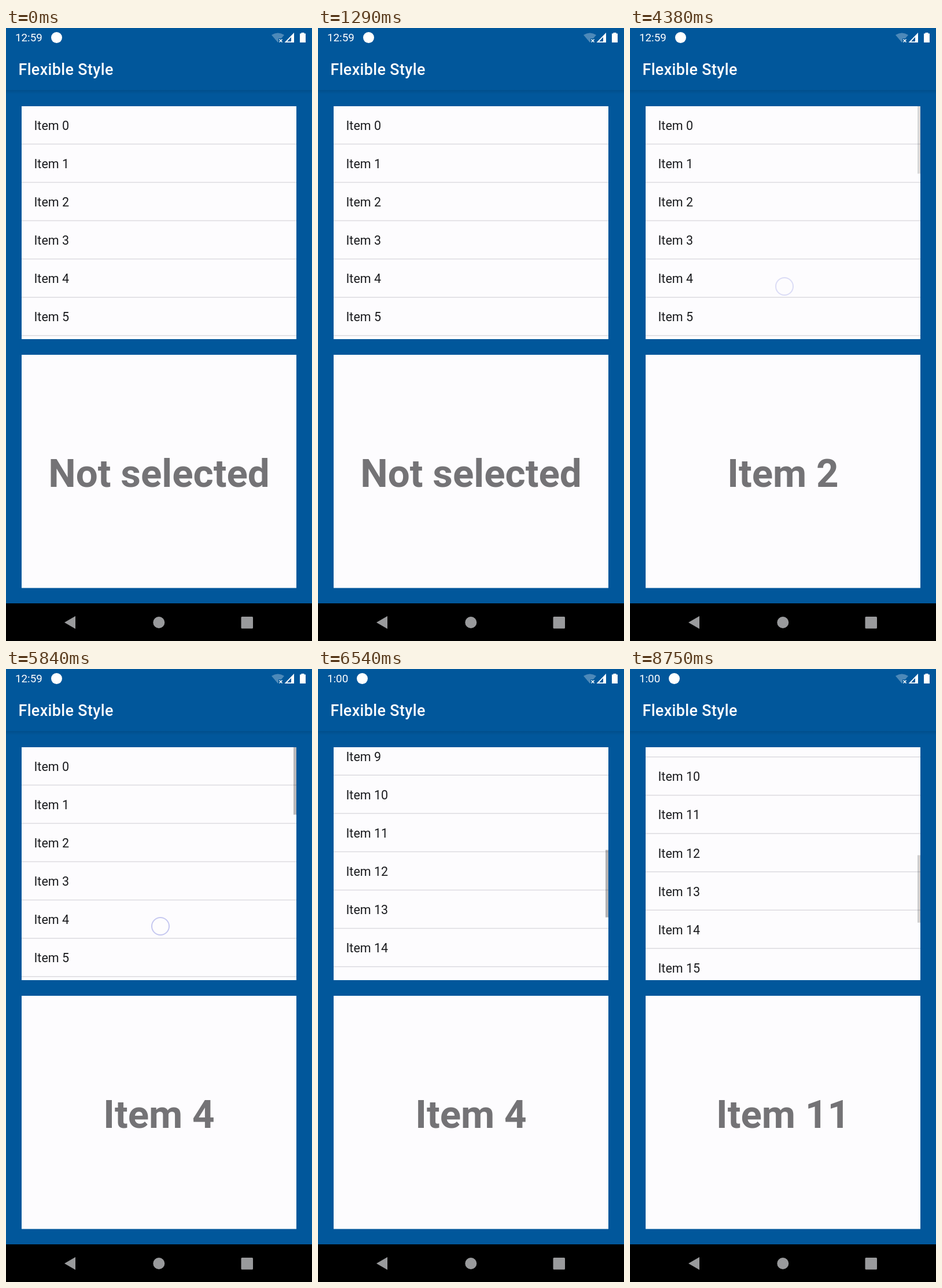
An HTML page with a canvas for the animation above (8.83 s loop, 529x1058 px).

```html
<!DOCTYPE html>
<html lang="en">
<head>
<meta charset="utf-8">
<title>Flexible Style</title>
<style>
  html, body { margin: 0; width: 100%; height: 100%; overflow: hidden; background: #01579b; }
  canvas { display: block; }
</style>
</head>
<body>
<canvas id="stage" width="529" height="1058"></canvas>
<script>
const ctx = document.getElementById('stage').getContext('2d');
const LOOP = 8830;
const BLUE = '#01579b', PAPER = '#fdfcfe', INK = '#1a1b1e';
const LIST = { x: 27, y: 135, w: 475, h: 402 };
const ROW = 66.1, COUNT = 21;

const DRAG = { from: 5850, to: 6100, end: 6870, dragged: 240, total: 643.5 };
const TAPS = [
  { item: 2, x: 259, y: 305, down: 2740, up: 2850, click: 2880 },
  { item: 4, x: 267, y: 446, down: 4350, up: 4450, click: 4470 },
  { item: 11, x: 262, y: 262, down: 7170, up: 7270, click: 7290 }
];
const CLOCK_TICK = 6200;

const clamp = v => Math.max(0, Math.min(1, v));
const progress = (t, from, to) => clamp((t - from) / (to - from));

function scrollAt(t) {
  if (t < DRAG.to) return DRAG.dragged * progress(t, DRAG.from, DRAG.to) ** 2;
  const left = (1 - progress(t, DRAG.to, DRAG.end)) ** 3;
  return DRAG.total - (DRAG.total - DRAG.dragged) * left;
}

function rect(color, x, y, w, h) {
  ctx.fillStyle = color;
  ctx.fillRect(x, y, w, h);
}

function disc(color, x, y, r) {
  ctx.fillStyle = color;
  ctx.beginPath();
  ctx.arc(x, y, r, 0, Math.PI * 2);
  ctx.fill();
}

function polygon(color, ...points) {
  ctx.fillStyle = color;
  ctx.beginPath();
  points.forEach(([x, y]) => ctx.lineTo(x, y));
  ctx.closePath();
  ctx.fill();
}

function text(str, x, y, font, color, align = 'left', spacing = '0px') {
  ctx.font = `${font} Roboto, sans-serif`;
  ctx.fillStyle = color;
  ctx.textAlign = align;
  ctx.letterSpacing = spacing;
  ctx.fillText(str, x, y);
}

function drawStatusBar(t) {
  const late = t >= CLOCK_TICK;
  text(late ? '1:00' : '12:59', 16, 23, '18.8px', '#fff');
  disc('#fff', late ? 76.5 : 87.5, 16.5, 9.5);

  // wifi without connection
  ctx.fillStyle = 'rgba(255,255,255,.3)';
  ctx.beginPath();
  ctx.moveTo(470, 25);
  ctx.lineTo(459, 12);
  ctx.quadraticCurveTo(470, 5, 481, 12);
  ctx.fill();
  rect(BLUE, 471, 18, 8, 8);
  ctx.strokeStyle = '#fff';
  ctx.lineWidth = 1.5;
  ctx.beginPath();
  ctx.moveTo(472.5, 19.5); ctx.lineTo(477.5, 24.5);
  ctx.moveTo(477.5, 19.5); ctx.lineTo(472.5, 24.5);
  ctx.stroke();

  // mobile signal
  polygon('#fff', [481.5, 25], [498, 25], [498, 8]);
  polygon(BLUE, [486, 23.2], [493, 23.2], [493, 15.8]);

  // battery
  rect('#fff', 508, 9.5, 10, 15.5);
  rect('#fff', 510.5, 8, 5, 2);
}

function drawAppBar() {
  text('Flexible Style', 21.5, 81, '500 26.9px', '#fff', 'left', '0.35px');
  const shade = ctx.createLinearGradient(0, 107, 0, 114);
  shade.addColorStop(0, 'rgba(0,0,0,.1)');
  shade.addColorStop(1, 'rgba(0,0,0,0)');
  rect(shade, 0, 107, 529, 7);
}

function barOpacity(t) {
  let wake = -Infinity;
  for (const tap of TAPS) if (t >= tap.click) wake = Math.max(wake, tap.click);
  if (t >= DRAG.from) wake = Math.max(wake, Math.min(t, DRAG.end));
  return 1 - progress(t - wake, 1350, 1650);
}

function drawList(t) {
  const scroll = scrollAt(t);
  rect(PAPER, LIST.x, LIST.y, LIST.w, LIST.h);
  ctx.save();
  ctx.beginPath();
  ctx.rect(LIST.x, LIST.y, LIST.w, LIST.h);
  ctx.clip();

  for (let i = 0; i < COUNT; i++) {
    const y = LIST.y + i * ROW - scroll;
    if (y + ROW < LIST.y || y > LIST.y + LIST.h) continue;
    rect('#dcdbe0', LIST.x, y + 64.6, LIST.w, 1.5);
    for (const tap of TAPS) {
      if (tap.item !== i) continue;
      const glow = progress(t, tap.click - 60, tap.click) * (1 - progress(t, tap.click + 80, tap.click + 360));
      if (glow) rect(`rgba(0,0,0,${0.13 * glow})`, LIST.x, y - 1.5, LIST.w, ROW + 1.5);
    }
    text('Item ' + i, 48.5, y + 40.8, '21.5px', INK);
  }

  const length = LIST.h * LIST.h / (COUNT * ROW);
  const top = LIST.y + scroll * LIST.h / (COUNT * ROW);
  rect(`rgba(0,0,0,${0.29 * barOpacity(t)})`, 497, top, 5, length);
  ctx.restore();
}

function drawDetail(t) {
  rect(PAPER, 27, 564, 475, 402.5);
  const chosen = TAPS.filter(tap => t >= tap.click).pop();
  text(chosen ? 'Item ' + chosen.item : 'Not selected', 264.5, 792, 'bold 67.3px', '#747376', 'center');
}

function drawTouch(t, x, y, down, up) {
  const alpha = progress(t, down, down + 50) * (1 - progress(t, up, up + 110));
  if (!alpha) return;
  ctx.save();
  ctx.globalAlpha = alpha;
  disc('rgba(255,255,255,.4)', x, y, 15);
  ctx.strokeStyle = '#c6c8f0';
  ctx.lineWidth = 2;
  ctx.beginPath();
  ctx.arc(x, y, 15, 0, Math.PI * 2);
  ctx.stroke();
  ctx.restore();
}

function drawNavBar() {
  const grey = '#999a9c';
  rect('#000', 0, 993, 529, 65);
  polygon(grey, [101, 1026], [120, 1015], [120, 1037]);
  disc(grey, 264.3, 1026, 10);
  ctx.beginPath();
  ctx.roundRect(406.5, 1016, 20.5, 20.5, 1.5);
  ctx.fill();
}

function draw(t) {
  rect(BLUE, 0, 0, 529, 1058);
  drawStatusBar(t);
  drawAppBar();
  drawList(t);
  drawDetail(t);
  for (const tap of TAPS) drawTouch(t, tap.x, tap.y, tap.down, tap.up);
  drawTouch(t, 267, 444 - scrollAt(Math.min(t, DRAG.to)), 5780, DRAG.to);
  drawNavBar();
}

const start = performance.now();
function frame() {
  draw((performance.now() - start) % LOOP);
  requestAnimationFrame(frame);
}
frame();
</script>
</body>
</html>
```
